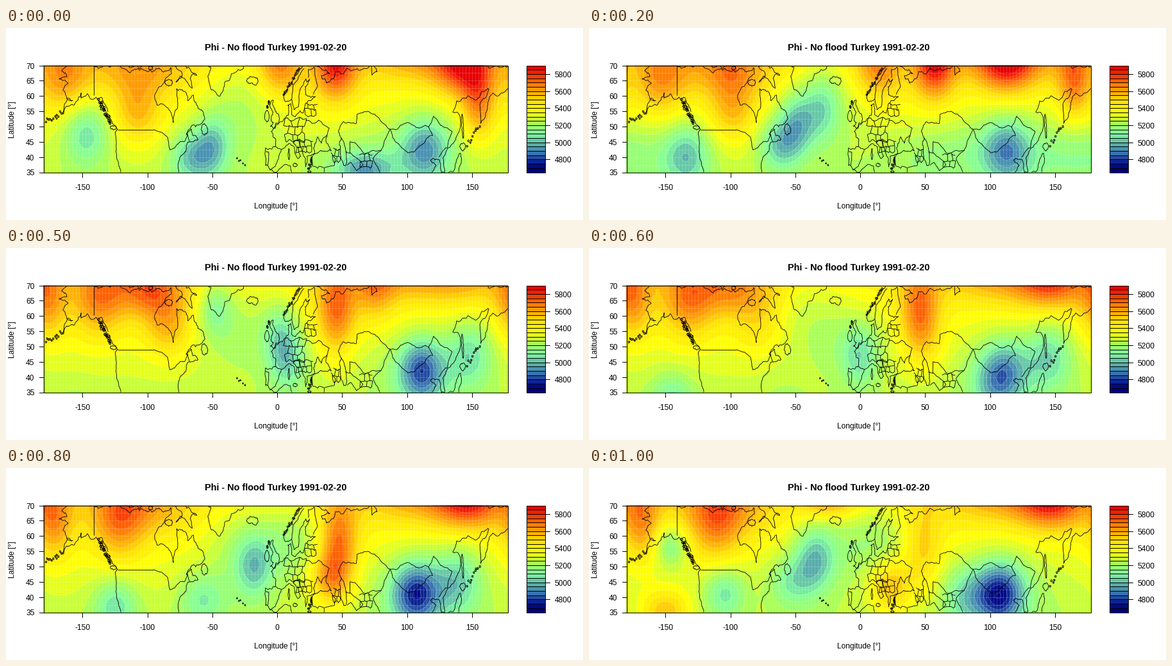
A matplotlib script that plays this animation: 900 px wide and 300 px high, repeating every 1100 ms.

```python
import numpy as np
import matplotlib.pyplot as plt
from matplotlib.animation import FuncAnimation
from matplotlib.collections import LineCollection
from matplotlib.colors import LinearSegmentedColormap
from matplotlib.patches import Rectangle

W, H, DPI = 900, 300, 100
PX = 72 / DPI
LEFT, RIGHT, TOP, BOTTOM = 58.5, 782.5, 58.5, 225.5
KEY_LEFT, KEY_RIGHT = 811.5, 840.5
FRAMES = 11
LEVELS = np.arange(4650, 5901, 50)

rng = np.random.default_rng(4)
plt.rcParams["font.family"] = "Liberation Sans"


def px(lon):
    return LEFT + (np.asarray(lon) + 180) / 357.5 * (RIGHT - LEFT)


def py(lat):
    return TOP + (70 - np.asarray(lat)) / 35 * (BOTTOM - TOP)


# ---------- map outlines ----------
outlines = []


def line(*pts, rough=0.0):
    """Polyline through lon, lat pairs, broken up by midpoint displacement."""
    p = np.reshape(pts, (-1, 2)).astype(float)
    for _ in range(3 if rough else 0):
        step = np.hypot(*np.diff(p, axis=0).T)[:, None]
        q = np.empty((2 * len(p) - 1, 2))
        q[::2] = p
        q[1::2] = (p[:-1] + p[1:]) / 2 + rng.normal(size=(len(p) - 1, 2)) * step * rough
        p = q
    outlines.append(np.column_stack([px(p[:, 0]), py(p[:, 1])]))


def coast(*pts):
    line(*pts, rough=0.1)


def border(*pts):
    line(*pts, rough=0.05)


def ring(lon, lat, w, h, lean=0.0):
    a = np.linspace(0, 2 * np.pi, 9)
    r = np.append(rng.uniform(0.85, 1.15, 8), 0)
    r[-1] = r[0]
    y = h * r * np.sin(a)
    coast(*np.column_stack([lon + w * r * np.cos(a) + lean * y, lat + y]).ravel())


def isles(lon0, lat0, lon1, lat1, n, size=0.6):
    for s in np.linspace(0, 1, n):
        lon, lat = rng.normal([lon0 + s * (lon1 - lon0), lat0 + s * (lat1 - lat0)], 0.35)
        ring(lon, lat, size, size / 2)


def states(lon0, lat0, lon1, lat1, nx, ny):
    """Patchwork of countries: a brick pattern with shaken corners."""
    sx, sy = (lon1 - lon0) / nx, (lat1 - lat0) / ny
    i, j = np.meshgrid(np.arange(2 * nx + 1), np.arange(ny + 1))
    shake = rng.uniform(-0.25, 0.25, (2,) + i.shape)
    x, y = lon0 + (i / 2 + shake[0]) * sx, lat0 + (j + shake[1]) * sy
    for row in range(ny + 1):
        border(*np.column_stack([x[row], y[row]]).ravel())
        for c in range(row % 2, 2 * nx + 1, 2):
            if row < ny:
                border(x[row, c], y[row, c], x[row + 1, c], y[row + 1, c])


# North America
coast(-161, 70.3, -166, 68.3, -162, 66.3, -168, 65.6, -161, 64.2, -165, 62, -162, 59,
      -157.5, 58.5, -164.5, 54.7, -157, 57, -151, 61, -151, 59.3, -146, 60.7, -139.5, 59.6,
      -134, 57, -130, 54, -127, 51, -123, 49, -124.7, 48.2, -124.2, 42, -122, 37, -120.6, 35)
ring(-126, 49.7, 2.3, 0.6, -1.5)
isles(-137, 58.5, -128.5, 51.2, 24, 0.8)
isles(-178, 51.8, -165, 54.2, 13)
line(-141, 70, -141, 60.3)
border(-137.5, 59, -135, 59.5, -131.8, 56.6, -130.2, 54.8)
line(-123, 49, -95.2, 49)
border(-95.2, 49, -89, 48.1, -84.5, 46.5, -82.5, 42.3, -79, 43, -75, 45, -71, 45.2,
       -69, 47.4, -67.4, 45)
coast(-75.6, 35, -76, 38.5, -74, 40.5, -70.3, 41.8, -70, 43.8, -66, 45, -61, 45.7, -65, 47,
      -66, 49.1, -70, 47.3, -66, 50.2, -59, 50.8, -55.7, 52.5, -61, 56, -64.5, 60.3,
      -69, 58.6, -71, 61.5, -77.5, 62.4, -76.6, 56.5, -79.3, 54, -80, 51.3, -82.3, 55,
      -92.5, 57, -94.5, 60, -87.5, 64.2, -81.5, 67.2, -82, 69.3, -91, 69, -95, 68.2,
      -106, 68.4, -115.5, 68.4, -124, 70, -135, 69.4, -141, 69.7)
coast(-71, 70.3, -62, 66.7, -67, 65.8, -65.5, 62.5, -78, 64.5, -73, 67, -79, 70.2)
coast(-117, 70.2, -106, 69, -103, 70.3)
ring(-56, 49, 2.6, 1.8)
ring(-83.5, 64.3, 2.8, 1.2)
ring(-97.5, 69.1, 1.7, 0.6)
# Greenland and the Atlantic islands
coast(-54, 70.3, -51, 69.3, -53.5, 66.5, -49.5, 62, -44, 60, -40.5, 64.5, -33, 67.5, -22, 70.2)
ring(-18.8, 64.9, 4.7, 1.2)
ring(-8, 53.4, 1.8, 1.7)
coast(-5.3, 50.1, 1.3, 51.2, 1.7, 52.7, -1.5, 55, -3, 58.6, -5.8, 57, -3.2, 54.7,
      -4.8, 52, -3, 51.4, -5.3, 50.1)
isles(-7.5, 56, -6.5, 58.3, 6)
isles(-31, 39.5, -25.3, 37.6, 5, 0.4)
# Europe
coast(-5.6, 36, -9, 37.2, -9, 43, -1.8, 43.4, -1.2, 46, -4.6, 48.4, -1.6, 49.4, 4, 51.6,
      8.5, 53.7, 8.2, 57, 10.5, 57.5, 11, 54, 20, 54.4, 21.5, 57.3, 24, 58.5, 29.5, 59.8,
      22, 60.3, 21.5, 63, 25, 65.5, 22, 65.6, 17.3, 61.5, 16.3, 56.5, 13, 55.5, 11, 59,
      6, 58.3, 5.2, 61.5, 13, 66.3, 20, 70.3)
isles(5, 60, 17, 69, 16)
coast(-5.6, 36, -0.5, 38, 3.2, 42.5, 8.8, 44.4, 15.8, 39.5, 18, 40.2, 12.4, 44.6,
      13.8, 45.4, 19.4, 41.5, 22, 36.8, 23, 40.3, 29, 41, 26.3, 40, 27.5, 37, 36, 36.5,
      35.9, 35)
coast(29, 41, 28, 43, 31, 46.6, 34, 44.5, 38.5, 47.1, 37.5, 45, 41.6, 42, 35, 42, 29, 41)
coast(-6, 35.8, -2, 35.1, 10, 37.2, 11, 35)
ring(14, 37.4, 1.6, 0.6)
ring(9, 40.8, 0.6, 1.8)
ring(24.8, 35.2, 1.3, 0.3)
isles(24.2, 36.3, 27, 39.2, 10)
border(-7.4, 37.2, -6.5, 41.6, -8.8, 41.9)
border(-1.8, 43.4, 3.1, 42.5)
border(27.8, 60.5, 31, 63, 29, 67, 28.5, 69.5, 24, 68.7, 24, 66)
border(11.3, 59, 12.3, 63.5, 20.6, 69)
states(6, 45.3, 22, 52.5, 3, 3)
states(15, 41.5, 27.5, 45.5, 3, 2)
states(21.5, 53.5, 30, 57.5, 2, 2)
border(22, 52, 32, 52.1, 40, 49.5, 38.2, 47.1)
# Asia
coast(28, 70.2, 40.5, 67.3, 34, 66.6, 38, 64.2, 44, 66.2, 45, 68, 59, 68.6, 68, 69,
      72.5, 69.8, 73, 66.8, 77, 68, 74, 70.2)
ring(51, 41.6, 2.2, 4.8, -0.35)
border(49, 46.3, 47, 48.5, 51, 51.6, 61, 51, 61.5, 54, 70, 55, 77, 53.3, 87, 49.1,
       82.5, 45.3, 80.2, 42.2, 68, 41.2, 61, 44.2, 56, 45, 56, 41.3, 52.5, 41.8)
border(56, 41.5, 66, 37.5, 61.2, 35.5, 57, 38.2, 53.9, 37.3)
border(80.2, 42.2, 73.8, 39.5, 79, 35)
border(41.5, 41.5, 44.8, 39.5, 44, 37.3, 36.3, 36.5)
states(64, 36.5, 74, 41, 2, 2)
states(43, 38.5, 48.5, 42.5, 2, 2)
border(87, 49.1, 98, 51, 107, 49.7, 116.7, 49.8, 119.7, 47, 111.5, 44, 105, 41.6,
       97, 42.7, 91, 45, 87, 49.1)
border(116.7, 49.8, 120.5, 53.4, 127.5, 50, 134.7, 48.3, 131, 43, 124.4, 40)
coast(130.6, 42.3, 127.5, 39.8, 129.2, 35.2, 126.5, 35, 125, 39, 121.3, 39.2, 118, 39,
      122.5, 37.2, 119.2, 35)
coast(130.6, 42.3, 135.5, 44.5, 140.3, 48.5, 141, 53, 135.2, 54.7, 143, 59.3, 155, 59.3,
      163, 62.3, 156, 57, 156.7, 51, 162, 56, 163.5, 59.8, 170, 60, 177.5, 62.5)
coast(132, 35, 137, 37, 141, 41.3, 142, 39.6, 140, 35)
ring(142.8, 50, 0.7, 4.1, -0.1)
ring(143, 43.4, 2.3, 1.3)
isles(146, 43.8, 156, 50.5, 10)
coast(152, 70.2, 168, 69.8, 177.5, 69.6)

# ---------- drifting highs and lows ----------
systems = []


def system(born, dies, start, end, size, strength):
    """A bump that drifts from start to end and swells and fades at its ends."""
    systems.append((born, dies, np.array(start), np.array(end), size, strength))


def still(born, dies, at, size, strength):
    system(born, dies, at, at, size, strength)


BEFORE, AFTER = -2, FRAMES + 1
# Asia
still(BEFORE, AFTER, (112, 44), (32, 9), -100)
system(BEFORE, AFTER, (115, 43), (107, 40), (13, 7.5), -290)
still(2, 6.5, (111, 43), (11, 7), -150)
still(5, 8.5, (101, 36), (12, 6), -220)
system(6.5, AFTER, (100, 42), (112, 41), (13, 7), -200)
still(8, AFTER, (82, 40), (13, 7), -200)
system(3, 10, (155, 50), (134, 44), (13, 8), -230)
still(BEFORE, AFTER, (115, 72), (35, 5), 190)
system(BEFORE, 4.5, (173, 68), (75, 71), (15, 6.5), 350)
still(4.5, AFTER, (148, 71), (18, 6), 350)
system(BEFORE, 5, (145, 50), (180, 76), (9, 9), 300)
system(BEFORE, 6, (33, 70), (81, 70), (11, 7.5), 430)
still(BEFORE, 2, (67, 36), (16, 4), -300)
still(-1, 4, (55, 41), (35, 7), -100)
# Europe
system(2, 11, (44, 67), (49, 53), (10, 10), 340)
system(5.5, AFTER, (62, 49), (6, 41), (11, 6), 270)
system(BEFORE, 4, (-10, 70), (26, 70), (12, 7), 270)
system(0.5, 6.5, (-45, 57), (18, 55), (10, 8), -210)
system(2, AFTER, (34, 42), (-52, 55), (11, 7.5), -240)
still(6, AFTER, (12, 59), (18, 9), -160)
# Atlantic
still(BEFORE, AFTER, (-28, 57), (21, 11), -130)
system(BEFORE, 6.5, (-50, 36), (-48, 69), (10, 7), -250)
system(BEFORE, 4, (-70, 36), (-58, 48), (12, 6), -270)
system(5.5, AFTER, (-62, 33), (-50, 50), (13, 6), -190)
still(8, AFTER, (-25, 71), (15, 3.5), 250)
# North America and the Pacific
still(BEFORE, AFTER, (-105, 70), (28, 6.5), 190)
system(BEFORE, 7, (-117, 54), (-75, 58), (13, 7.5), 210)
still(1, 7, (-98, 67), (13, 5), 130)
system(BEFORE, AFTER, (-175, 67), (-100, 62), (14, 8.5), 230)
system(2, AFTER, (-183, 66), (-165, 65), (10, 9), 260)
system(BEFORE, 4.5, (-161, 55), (-116, 32), (13, 7.5), -270)
still(0, 4, (175, 41), (32, 8), -140)
system(4.5, AFTER, (-160, 30), (-84, 46), (12, 6), -230)
still(8, AFTER, (-150, 35), (14, 5), 270)
still(8, AFTER, (-146, 57), (9, 5), -240)

LON, LAT = np.meshgrid(np.arange(-180, 178, 2.5), np.arange(35, 70.1, 2.5))


def phi(k):
    z = 5350 + 4.5 * (LAT - 52)
    for born, dies, start, end, (w, h), strength in systems:
        s = np.clip(min(k - born, dies - k) / 2, 0, 1)
        x, y = start + (end - start) * (k - born) / (dies - born)
        dx = (LON - x + 180) % 360 - 180
        z = z + strength * s * s * (3 - 2 * s) * np.exp(-((dx / w) ** 2 + ((LAT - y) / h) ** 2) / 2)
    return np.clip(z, LEVELS[0] + 1, LEVELS[-1] - 1)


ramp = LinearSegmentedColormap.from_list("phi", [
    (0, "#000080"), (0.06, "#00108a"), (0.18, "#4080b4"), (0.28, "#62c0a8"),
    (0.36, "#80ff9c"), (0.45, "#a4ff5c"), (0.58, "#ffff00"), (0.68, "#ffe000"),
    (0.76, "#ffae00"), (0.86, "#ff7000"), (0.94, "#fa2c00"), (1, "#e60000")])
colors = [ramp(v) for v in np.linspace(0, 1, len(LEVELS) - 1)]

# ---------- stage ----------
fig = plt.figure(figsize=(W / DPI, H / DPI), dpi=DPI, facecolor="white")
ax = fig.add_axes([0, 0, 1, 1])
ax.set(xlim=(0, W), ylim=(H, 0))
ax.axis("off")


def text(x, y, s, size=12, ha="center", **kw):
    ax.text(x, y, s, fontsize=size * PX, ha=ha, va=kw.pop("va", "baseline"), **kw)


def stroke(xs, ys):
    ax.plot(xs, ys, color="black", lw=PX, zorder=6)


frame = Rectangle((LEFT, TOP), RIGHT - LEFT, BOTTOM - TOP, fill=False, lw=PX, zorder=6)
ax.add_patch(frame)
seam = dict(color="white", lw=0.45, alpha=0.28, zorder=2)
ax.vlines(px(LON[0, 1:-1]), TOP, BOTTOM, **seam)
ax.hlines(py(LAT[1:-1, 0]), LEFT, RIGHT, **seam)
land = LineCollection(outlines, colors="black", linewidths=0.85 * PX, zorder=4)
ax.add_collection(land, autolim=False)
land.set_clip_path(frame)

text(421, 35, "Phi - No flood Turkey 1991-02-20", 14.4, weight="bold")
text(421, 282, "Longitude [°]")
text(10, 143, "Latitude [°]", rotation=90, va="center")
for lon in range(-150, 151, 50):
    stroke([px(lon)] * 2, [BOTTOM, BOTTOM + 7])
    text(px(lon), 253, str(lon))
for lat in range(35, 71, 5):
    stroke([LEFT - 7, LEFT], [py(lat)] * 2)
    text(44.5, py(lat) + 5, str(lat), ha="right")

# colour key
cell = (BOTTOM - TOP) / len(colors)
for i, c in enumerate(colors):
    ax.add_patch(Rectangle((KEY_LEFT, BOTTOM - (i + 1) * cell), KEY_RIGHT - KEY_LEFT, cell,
                           facecolor=c, edgecolor="black", lw=PX, zorder=5))
for v in range(4800, 5801, 200):
    y = BOTTOM - (v - LEVELS[0]) / 50 * cell
    stroke([KEY_RIGHT, KEY_RIGHT + 7], [y, y])
    text(855.5, y + 5, str(v), ha="left")

layers = []


def draw(k):
    while layers:
        layers.pop().remove()
    z = phi(k)
    layers.append(ax.contourf(px(LON), py(LAT), z, LEVELS, colors=colors, zorder=1))
    layers.append(ax.contour(px(LON), py(LAT), z, LEVELS, colors="white",
                             linewidths=0.4, alpha=0.28, zorder=2))
    ax.set(xlim=(0, W), ylim=(H, 0))
    return layers


anim = FuncAnimation(fig, draw, frames=FRAMES, init_func=lambda: [], interval=100,
                     repeat=True, repeat_delay=0, blit=False)
plt.show()
```
